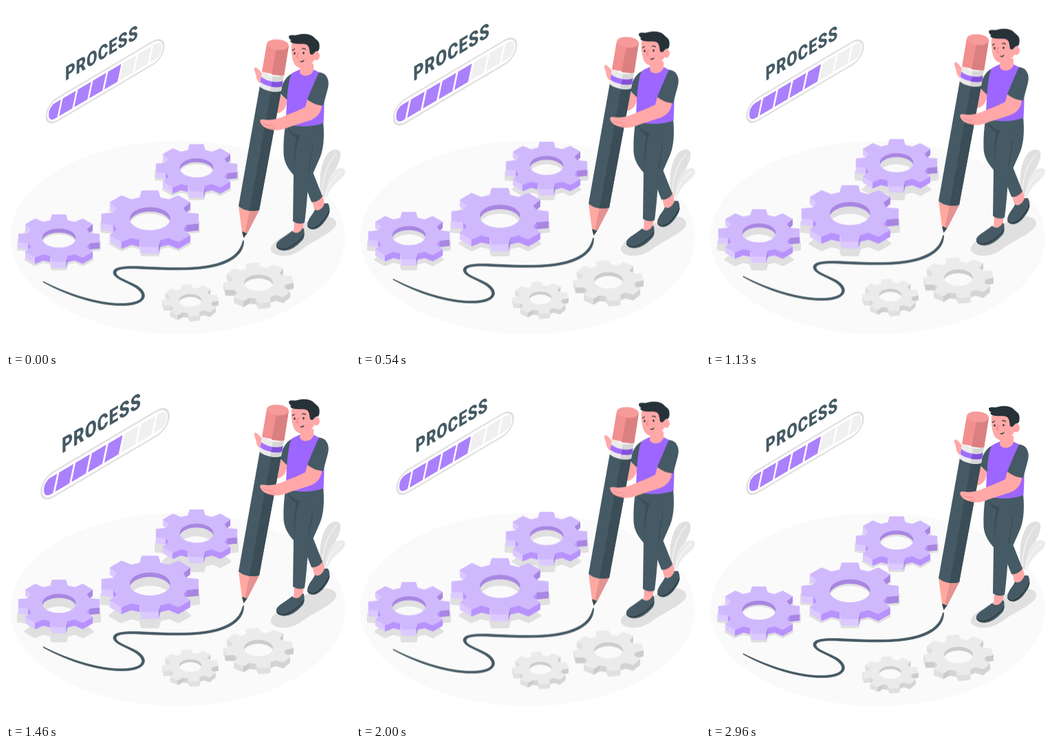
An HTML page for the animation above (3 s loop, 500 by 500 pixels).

```html
<!DOCTYPE html>
<html lang="en">
<head>
<meta charset="utf-8">
<title>Process</title>
<style>
  html, body { margin: 0; width: 100%; height: 100%; overflow: hidden; background: #fff; }
  svg { display: block; width: 100%; height: 100%; }
  .float { animation: float 3s linear -30ms infinite; }
  .beat { transform-origin: 144px 100px; animation: beat 3s linear -30ms infinite; }
  @keyframes float { 50% { transform: translateY(-10px); } }
  @keyframes beat {
    0%, 30%, 40%, 60%, 100% { transform: scale(1); }
    10%, 50% { transform: scale(1.1); }
  }
  .label { font: 900 28px Roboto, "Liberation Sans", sans-serif; letter-spacing: 1px; }
  .slate { fill: #455a64; }
  .deep { fill: #3b4d56; }
  .ink { fill: #263238; }
  .skin { fill: #ffa8a7; }
  .violet { fill: #9c66ff; }
  .line { fill: none; stroke-linecap: round; stroke-linejoin: round; }
</style>
</head>
<body>
<svg viewBox="0 0 500 500">
  <defs>
    <clipPath id="cells"><rect x="63" y="98" width="162.5" height="22.6" rx="9.5"/></clipPath>
  </defs>

  <ellipse cx="249.5" cy="336.5" rx="243.5" ry="140.6" fill="#fafafa"/>
  <g id="shadows"></g>
  <path fill="#e0e0e0" d="M385 352C386 341 419 326 440 312C456 302 478 304 480 315C482 327 450 339 431 353C415 366 390 366 385 355Z"/>

  <g id="plant">
    <path fill="#e0e0e0" d="M458 274C454 250 458 226 468 214C475 207 484 207 486 213C488 222 480 236 473 248C467 258 464 268 463 278Z"/>
    <path fill="#ebebeb" d="M463 278C464 262 469 246 478 239C485 234 492 235 493 240C493 247 486 252 479 258C473 264 469 270 467 277Z"/>
    <path class="line" stroke="#fff" stroke-width="1" d="M460 274C460 248 467 229 480 215M465 276C468 260 476 249 488 241"/>
  </g>

  <g class="float">
    <g id="gears"></g>
    <path class="slate" stroke="#455a64" stroke-width=".7" stroke-linejoin="round" d="M54 400.5C95 421 140 434 172 432.5C202 431 204 419 186 408C170 399 157 396 156 388C155 378 178 378 200 379C250 381.5 295 383 323 368C338 360 342 350 344.5 341L345.5 341C346 352 340 363 325 371C297 386 250 384.5 202 382.5C180 381 160 381 160 388C161 395 176 399 190 406.5C209 418 205 434.5 172 435.5C138 436.5 92 423 54 401.5Z"/>

    <g id="man">
      <!-- far arm and hand -->
      <path class="skin" d="M398 128L409 136C408 146 404 153 396 156L389 155V132Z"/>
      <path class="skin" d="M376 121C371 113 365 110 364 104C364 99 360 94 361 90C364 88 368 93 371 97L380 99V121Z"/>
      <path class="slate" d="M417 98C406 102 402 113 397 126L409 137L417 122Z"/>

      <!-- ankles and shoes -->
      <path class="skin" d="M444 280L460 274L463 288C462 296 451 300 448 295Z"/>
      <path class="skin" d="M419 312L433 313L431 328C428 335 418 336 418 330Z"/>
      <path class="slate" d="M438 317C440 307 446 304 449 296C453 299 460 296 463 287L468 287C471 292 471 299 469 304C464 314 456 324 447 325C441 325 438 322 438 317Z"/>
      <path class="slate" d="M393 346C396 339 407 335 416 327C420 332 427 331 431 323L433 324C434 330 434 335 432 339C426 346 418 354 407 355.5C398 356.5 392 353 393 346Z"/>
      <path class="line" stroke="#263238" stroke-width="1.1" d="M438.5 320C442 325 449 324 455 319C462 312 467 306 470 298M393.5 350C397 355 406 355 414 350C422 345 429 340 433 333"/>

      <!-- trousers -->
      <path class="slate" d="M426 170L461 168C463 188 462 206 457 219L446.5 243L460 277C456 283 449 286 444 285L424 235Z"/>
      <path class="slate" d="M407 168L446 171C445 196 441 214 440 238C439 264 437 292 434 315C428 318 421 316 417 313L418 246C410 237 404 227 403.5 215C403 200 404 184 407 168Z"/>
      <path class="deep" d="M409 176C414 183 420 187 427 188C421 205 420 222 419 240C418 223 419 207 422 192C416 188 411 183 409 176Z"/>
      <path class="line" stroke="#37474f" stroke-width=".9" d="M440 240C442 222 445 213 446 203"/>

      <!-- torso and head -->
      <path class="violet" d="M417 97L428 92H446L460 99C463 122 463 148 461.5 170C446 177 421 176 406.5 171C408 150 408 124 412 108C413 102 415 99 417 97Z"/>
      <path class="skin" d="M428 84H447V94C443 103 431 104 427 97Z"/>
      <path class="skin" d="M415 56C414 66 416 76 418 82C421 89 428 92 434 90C441 88 446 83 449 77L450 53C438 46 421 47 415 56Z"/>
      <ellipse class="skin" cx="451" cy="72.5" rx="5" ry="6.5"/>
      <path class="ink" d="M411 44C415 41 419 44 424 42C432 40 441 40 447 45C450 49 455 50 455.5 56C456 62 455 65 453 66C449 65 448 70 445 71L442 70C441 64 441 60 438 57C433 54 427 56 422 55C414 55 411 50 415 50C412 49 411 47 411 44Z"/>
      <ellipse class="ink" cx="419.5" cy="69" rx="1.2" ry="1.8"/>
      <ellipse class="ink" cx="432.5" cy="68.5" rx="1.2" ry="1.8"/>
      <path class="line" stroke="#263238" stroke-width="1.2" d="M416.5 64.5L419.5 62.8M430.5 62.3C432 61.5 434 62 435.5 63.2"/>
      <path class="line" stroke="#eb8384" stroke-width="1.1" d="M425 68L422.5 74.5L425.5 75.5"/>
      <path class="ink" d="M426.5 80.5C429 80.8 431.5 80 433.5 78.2C433.5 81.2 430 83.3 426.5 80.5Z"/>

      <!-- pencil -->
      <path fill="#f28f8f" d="M379 55L372 96L404 102L411 58Z"/>
      <path fill="#db8081" d="M393 63C400 66 408 64 411 57L404 102L386 100Z"/>
      <ellipse cx="395" cy="56.5" rx="16" ry="7.7" transform="rotate(5 395 56.5)" fill="#f79a9a"/>
      <path class="slate" d="M369 116L338 291C344 297.5 358 300.5 368 297L400 124Z"/>
      <path class="deep" d="M386 121L354 298C359 298.8 364 298.5 368 297L400 123Z"/>
      <path fill="#ebebeb" d="M372 95C378 101 396 105 404 100.5L400 123.5C391 127 374 123 368.5 117Z"/>
      <path fill="#d6d6d6" d="M388 102.4C395 103.5 401 102.5 404 100.5L400 123.5C396 125.3 390 125.3 384 124Z"/>
      <path fill="#a26eff" d="M371 103C377 109 394 113 402.5 109L401 117C392 120 375 116 369.7 110.5Z"/>
      <path fill="#8250dc" d="M387 110.5C393 111.5 399 110.8 402.5 109L401 117C397 118.7 391 118.5 385.5 117.5Z"/>
      <path fill="#ffa8a0" d="M338 291C344 297.5 358 300.5 368 297L351 330C348 331 346 327 343 328.5Z"/>
      <path fill="#e59292" d="M354 298C359 298.8 364 298.5 368 297L351 330L347.5 328.5Z"/>
      <path fill="#37474f" d="M343 328.5C346 327 348 331 351 330L345.5 337.5Z"/>

      <!-- near arm -->
      <path class="skin" d="M438 136L459 143C459 154 453 162 443 166L412 176C402 181 389 182 383 179C376 178 371 173 370 170C368 166 370 164.5 374 165C382 167 392 165 400 162C412 157 428 151 435 147Z"/>
      <path class="line" stroke="#eb8384" stroke-width=".9" d="M374 171C379 174 384 174 388 173M383 179C386 179 389 178 391 177"/>
      <path class="slate" d="M455 96.5C460 97 464 99 466 103C470 109 469 116 467 123L461 145C453 145 444 141 438 136C443 124 449 109 455 96.5Z"/>
    </g>
  </g>

  <g class="beat">
    <text class="label slate" transform="matrix(.8 -.472 0 1 86.5 109)">PROCESS</text>
    <g transform="translate(0 84.96) skewY(-30.54)">
      <rect x="59.7" y="93" width="168.6" height="32.6" rx="15.8" fill="#fff" stroke="#e0e0e0" stroke-width="2.5"/>
      <g id="bar" clip-path="url(#cells)"></g>
    </g>
  </g>
</svg>
<script>
  const NS = 'http://www.w3.org/2000/svg';
  const SQUASH = 0.577;
  const byId = id => document.getElementById(id);

  function add(parent, tag, attrs) {
    const el = document.createElementNS(NS, tag);
    for (const key in attrs) el.setAttribute(key, attrs[key]);
    return parent.appendChild(el);
  }

  const toPath = pts => 'M' + pts.map(p => p.map(n => n.toFixed(2)).join(' ')).join('L') + 'Z';

  // Four corners for each of the eight teeth, flattened to the ground plane.
  function outline(cx, cy, r, turn) {
    const pts = [];
    for (let tooth = 0; tooth < 8; tooth++) {
      for (const [deg, k] of [[-15.5, .78], [-9.6, 1.01], [9.6, 1.01], [15.5, .78]]) {
        const a = (tooth * 45 + deg + turn) * Math.PI / 180;
        pts.push([cx + r * k * Math.cos(a), cy + r * k * Math.sin(a) * SQUASH]);
      }
    }
    return pts;
  }

  const ring = (cx, cy, r) =>
    `M${cx - r} ${cy}a${r} ${r * SQUASH} 0 1 0 ${2 * r} 0a${r} ${r * SQUASH} 0 1 0 ${-2 * r} 0Z`;

  const purple = { top: '#d0b8fd', light: '#dcc9ff', mid: '#b892fd', dark: '#a886e2' };
  const grey = { top: '#ebebeb', light: '#e0e0e0', mid: '#d4d4d4', dark: '#cccccc' };

  function shade(kind, nx, colors) {
    if (kind === 1) return nx > .5 ? colors.mid : colors.light;
    if (kind === 3 || Math.abs(Math.abs(nx) - .5) < .1) return colors.mid;
    return nx > 0 ? colors.dark : colors.light;
  }

  function gear(cx, cy, r, hole, depth, turn, colors) {
    const g = add(byId('gears'), 'g', { 'stroke-linejoin': 'round', 'stroke-width': 1 });
    const pts = outline(cx, cy, r, turn);
    const walls = pts.map((p, i) => {
      const q = pts[(i + 1) % pts.length];
      const dx = q[0] - p[0], dy = (q[1] - p[1]) / SQUASH;
      return { p, q, kind: i % 4, nx: dy / Math.hypot(dx, dy), front: dx < 0 };
    }).filter(w => w.front).sort((a, b) => a.p[1] + a.q[1] - b.p[1] - b.q[1]);

    for (const { p, q, kind, nx } of walls) {
      const fill = shade(kind, nx, colors);
      add(g, 'path', {
        d: toPath([p, q, [q[0], q[1] + depth], [p[0], p[1] + depth]]), fill, stroke: fill
      });
    }

    // The visible inner wall lies between the hole's upper and lower rims.
    const ry = hole * SQUASH, half = depth * .35;
    const x = hole * Math.sqrt(1 - (half / ry) ** 2);
    add(g, 'path', {
      d: `M${cx - x} ${cy + half}A${hole} ${ry} 0 1 1 ${cx + x} ${cy + half}` +
         `A${hole} ${ry} 0 0 0 ${cx - x} ${cy + half}Z`,
      fill: colors.dark
    });
    add(g, 'path', {
      d: toPath(pts) + ring(cx, cy, hole), fill: colors.top, stroke: colors.top, 'fill-rule': 'evenodd'
    });
  }

  function shadow(cx, cy, r, hole, depth) {
    const g = byId('shadows');
    add(g, 'path', {
      d: toPath(outline(cx, cy + depth + 2, r + 1, 0)),
      fill: '#e0e0e0', stroke: '#e0e0e0', 'stroke-width': 2.5, 'stroke-linejoin': 'round'
    });
    add(g, 'path', { d: ring(cx, cy + depth, hole), fill: '#fafafa' });
  }

  for (const spec of [[277, 235.5, 59, 25, 9], [209.3, 309.3, 70.5, 30, 10], [77, 337.5, 59, 25, 9]]) {
    shadow(...spec);
    gear(...spec, 0, purple);
  }
  gear(367, 402.5, 50, 21.5, 8.5, -10, grey);
  gear(268, 428, 40, 17, 7, -9, grey);

  // Slanted cells of the progress bar; the first five are filled.
  for (let i = 0; i < 8; i++) {
    const left = 57.5 + 21.7 * i + 1.4, right = left + 18.9;
    add(byId('bar'), 'path', {
      d: toPath([[left + 2.7, 98], [right + 2.7, 98], [right - 2.7, 120.6], [left - 2.7, 120.6]]),
      fill: i < 5 ? '#ab80fd' : '#f0f0f0'
    });
  }
</script>
</body>
</html>
```
